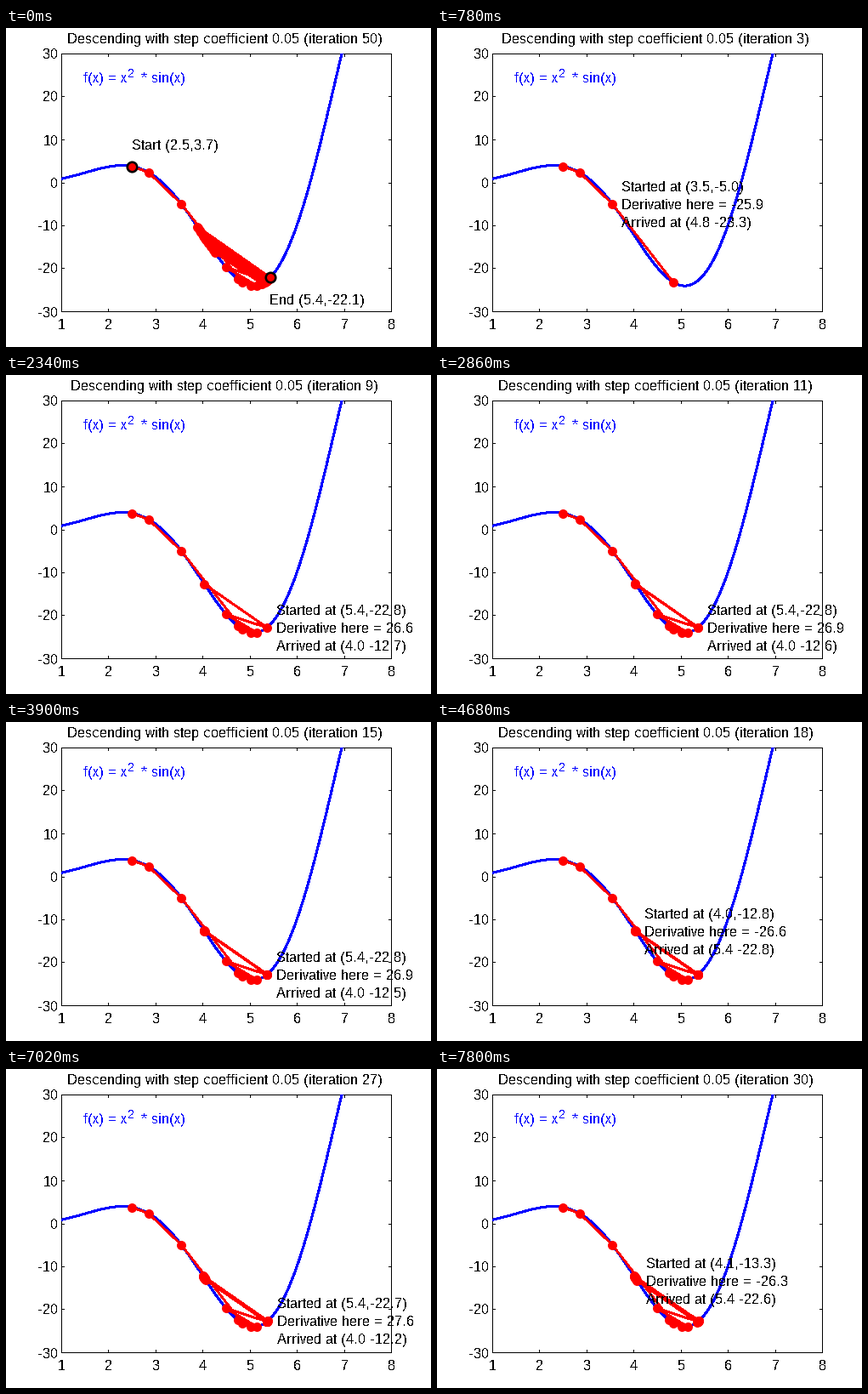
A matplotlib script that plays this animation: 500x375 px, repeating every 8 s.

```python
import numpy as np
import matplotlib.pyplot as plt
from matplotlib.animation import FuncAnimation
from matplotlib.patches import Rectangle

W, H, DPI = 500, 375, 100
LEFT, RIGHT, TOP, BOTTOM = 65, 453, 30, 333
STEP, STEPS = 0.05, 50
TICK = 20          # ms per animation frame
HOLD = 260         # ms per iteration
LOOP = 8000
PT = 72 / DPI      # points per pixel

plt.rcParams.update({
    "font.family": "Liberation Sans",
    "font.size": 12,
    "text.antialiased": False,
    "text.hinting": "native",
    "text.hinting_factor": 1,
})


def f(x):
    return x**2 * np.sin(x)


def slope(x):
    return 2 * x * np.sin(x) + 2 * x**2 * np.cos(x)


def px(x):
    return LEFT + (x - 1) * (RIGHT - LEFT) / 7


def py(y):
    return TOP + (30 - y) * (BOTTOM - TOP) / 60


path = [2.5]
for _ in range(STEPS):
    path.append(path[-1] - STEP * slope(path[-1]))
path = np.array(path)

fig = plt.figure(figsize=(W / DPI, H / DPI), dpi=DPI, facecolor="white")
ax = fig.add_axes([0, 0, 1, 1])
ax.set(xlim=(0, W), ylim=(H, 0))
ax.axis("off")


def line(xs, ys, color="black", width=1, **kw):
    return ax.plot(xs, ys, color=color, lw=width * PT, antialiased=False,
                   snap=kw.pop("snap", False), **kw)[0]


def label(x, y, text="", **kw):
    """Text whose capitals are centred vertically on y."""
    return ax.text(x, y + 6, text, va="baseline", **kw)


def draw_axes():
    x0, x1, y0, y1 = LEFT + 0.5, RIGHT + 0.5, TOP + 0.5, BOTTOM + 0.5
    line([x0, x1, x1, x0, x0], [y0, y0, y1, y1, y0])
    for v in range(1, 9):
        x = round(px(v)) + 0.5
        line([x, x], [y0, y0 + 3])
        line([x, x], [y1, y1 - 3])
        label(x, 348.5, str(v), ha="center")
    for v in range(-30, 31, 10):
        y = round(py(v)) + 0.5
        line([x0, x0 + 3], [y, y])
        line([x1, x1 - 3], [y, y])
        label(61.5, y, str(v), ha="right")


draw_axes()
xs = np.linspace(1, 8, 141)
curve = line(px(xs), py(f(xs)), "blue", 2)
curve.set_clip_path(Rectangle((LEFT, TOP), RIGHT - LEFT, BOTTOM - TOP,
                              transform=ax.transData))

label(91, 58.5, "f(x) = x", color="blue")
label(143.5, 52, "2", color="blue", size=10)
label(159, 58.5, "* sin(x)", color="blue")

# Two thin strokes one pixel apart: a pen two pixels high at any slope.
strokes = [line([], [], "red") for _ in range(2)]
dots = line([], [], "red", ls="none", marker="o", ms=11 * PT, mew=0, snap=None)
ends = line(px(path[[0, -1]]), py(f(path[[0, -1]])), "red", ls="none",
            marker="o", ms=11.5 * PT, mec="black", mew=2.6 * PT, snap=None)
title = label(257.5, 11.5, ha="center", size=12.24)
notes = [label(0, 0) for _ in range(3)]


def write(note, x, y, text):
    note.set_position((x - 0.5, y + 6))
    note.set_text(text)


def update(n):
    k = n * TICK // HOLD
    done = k == 0
    k = k or STEPS
    x, y = px(path[:k + 1]), py(f(path[:k + 1]))
    for dy, stroke in enumerate(strokes):
        stroke.set_data(x, y + dy - 0.5)
    dots.set_data(x, y)
    title.set_text(f"Descending with step coefficient 0.05 (iteration {k})")
    ends.set_visible(done)
    if done:
        a, b = path[0], path[-1]
        write(notes[0], px(a), py(f(a) + 5), f"Start ({a:.1f},{f(a):.1f})")
        write(notes[1], px(b), py(f(b) - 5), f"End ({b:.1f},{f(b):.1f})")
        write(notes[2], 0, 0, "")
    else:
        a, b = path[k - 1], path[k]
        lines = (f"Started at ({a:.1f},{f(a):.1f})",
                 f"Derivative here = {slope(a):.1f}",
                 f"Arrived at ({b:.1f} {f(b):.1f})")
        for i, (note, text) in enumerate(zip(notes, lines)):
            write(note, px(a + 0.2), py(f(a)) + 21 * (i - 1), text)
    return *strokes, dots, ends, title, *notes


anim = FuncAnimation(fig, update, frames=LOOP // TICK, interval=TICK,
                     repeat=True, repeat_delay=0)
plt.show()
```
